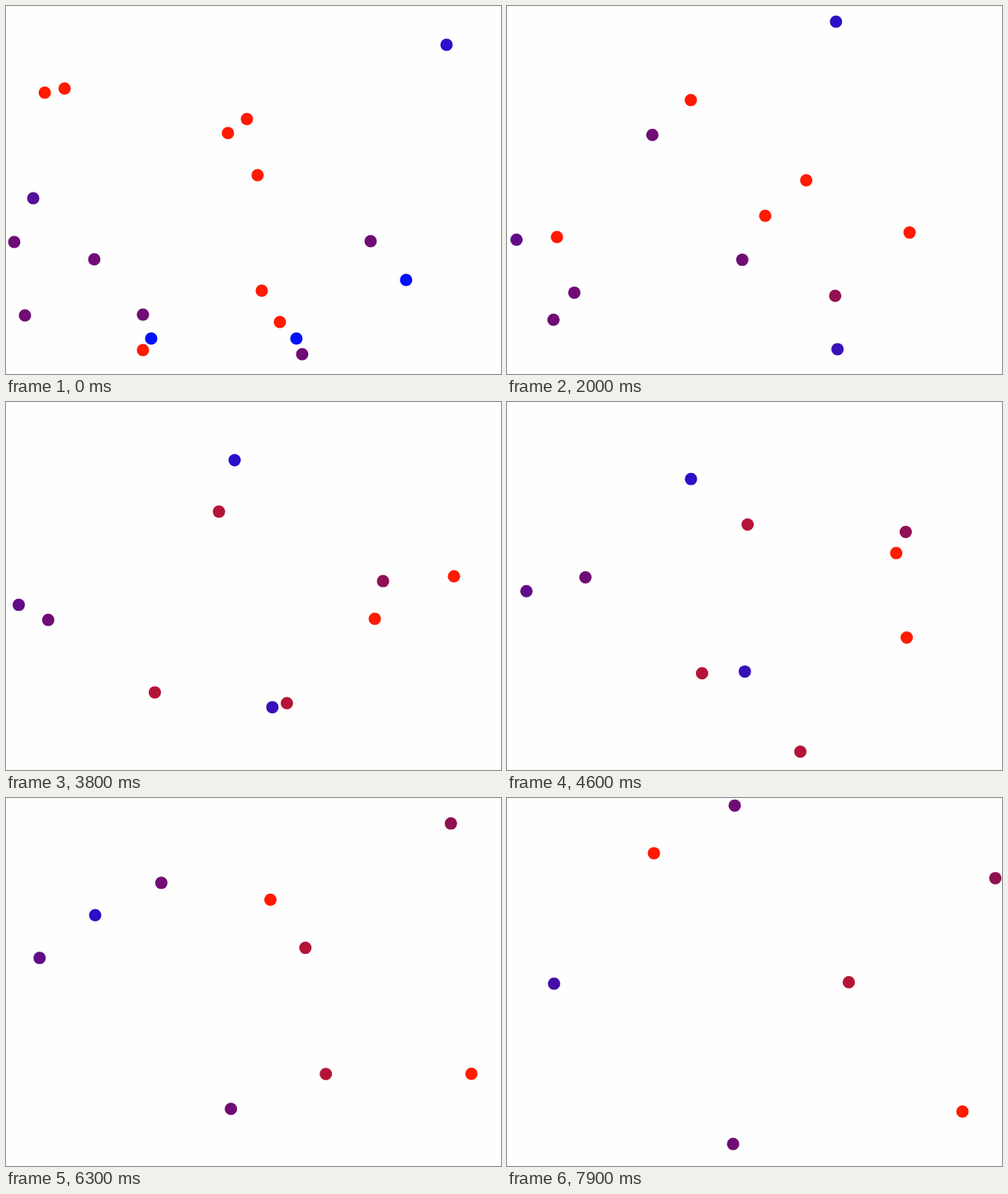
These frames come from a looping animation (600 by 446 pixels, 8000 ms). An HTML page with a canvas:

```html
<!DOCTYPE html>
<html lang="en">
<head>
<meta charset="utf-8">
<title>Merging balls</title>
<style>
  html, body { margin: 0; height: 100%; overflow: hidden; background: #fefefe; }
  canvas { display: block; }
</style>
</head>
<body>
<canvas id="stage" width="600" height="446"></canvas>
<script>
const W = 600, H = 446, RADIUS = 7.5, EDGE = 4.4;
const LOOP = 8000, STEP = 100;
const RED = '#ff1a00', BLUE = '#0010ff', NAVY = '#2a10c8', PURPLE = '#700c75',
      VIOLET = '#55109a', INDIGO = '#600c88', CRIMSON = '#b41438',
      MAGENTA = '#901052', COBALT = '#3810b8', DUSK = '#420ea6';
const ctx = document.getElementById('stage').getContext('2d');

// Reflects a straight path between the two walls of one axis.
function fold(p, size) {
  const span = size - 2 * EDGE, period = 2 * span;
  const q = ((p - EDGE) % period + period) % period;
  return EDGE + span - Math.abs(q - span);
}

// Speeds are in pixels per second; a leg begins at each collision.
class Ball {
  constructor(color, x, y, vx, vy) {
    this.legs = [{ start: 0, x, y, vx, vy, color }];
    this.end = Infinity;
  }
  at(t) {
    const leg = this.legs.findLast(l => l.start <= t);
    const dt = t - leg.start;
    return {
      x: fold(leg.x + leg.vx * dt, W),
      y: fold(leg.y + leg.vy * dt, H),
      color: leg.color
    };
  }
  turn(start, vx, vy, color) {
    const { x, y } = this.at(start);
    this.legs.push({ start, x, y, vx, vy, color });
    return this;
  }
  until(t) {
    this.end = t;
    return this;
  }
}

const ball = (...args) => new Ball(...args);

const balls = [
  // never merge
  ball(RED, 310, 345, 89, -35.2),
  ball(RED, 269, 154, 46.85, 28.6),
  ball(PURPLE, 166, 374, -54.84, 64.5),

  // absorb others
  ball(NAVY, 534, 47, -67.6, -28.6).turn(7.08, 2, 74, DUSK),
  ball(RED, 332, 383, 32.9, 74.5).turn(0.38, 32.9, 74.5, MAGENTA),
  ball(BLUE, 485, 332, -39, 3.5)
    .turn(0.48, -43.2, 54.1, COBALT).turn(4.99, 0.9, 54.4, PURPLE),
  ball(RED, 305, 205, 4, 24.6)
    .turn(2.44, 18.9, 73.5, CRIMSON).turn(7.79, -14, -15, CRIMSON),

  // absorb others, then vanish
  ball(RED, 292, 137, -34.6, -11.5).turn(2.524, 41.9, 19.5, CRIMSON).until(7.85),
  ball(VIOLET, 33, 233, -11.4, 72).turn(0.99, -10.1, -20.8, INDIGO).until(7.08),
  ball(PURPLE, 10, 286, -41.4, 30.7).turn(2.95, 70, -29, CRIMSON).until(4.96),
  ball(RED, 47, 105, 44, 66).turn(0.1, -54.3, 88.6, RED).until(2.95),
  ball(BLUE, 176, 403, 54.6, 86.3).turn(0.15, 54.6, 86.3, PURPLE).until(2.42),
  ball(BLUE, 352, 403, 10, 35).turn(0.15, 10, 35, COBALT).until(0.38),

  // absorbed
  ball(RED, 71, 100, -90, 30).until(0.1),
  ball(RED, 166, 417, 40, 33).until(0.15),
  ball(PURPLE, 359, 422, -20, -30).until(0.15),
  ball(PURPLE, 442, 285, 32, 72).until(0.48),
  ball(PURPLE, 23, 375, -1.4, -70).until(0.99),
  ball(PURPLE, 107, 307, 34.6, -75.4).until(2.524)
];

function draw(now) {
  const t = Math.floor(now % LOOP / STEP) * STEP / 1000;
  ctx.fillStyle = '#fefefe';
  ctx.fillRect(0, 0, W, H);
  for (const b of balls) {
    if (t >= b.end) continue;
    const { x, y, color } = b.at(t);
    ctx.fillStyle = color;
    ctx.beginPath();
    ctx.arc(x, y, RADIUS, 0, 2 * Math.PI);
    ctx.fill();
  }
}

const begin = performance.now();
function tick() {
  draw(performance.now() - begin);
  requestAnimationFrame(tick);
}
tick();
</script>
</body>
</html>
```
